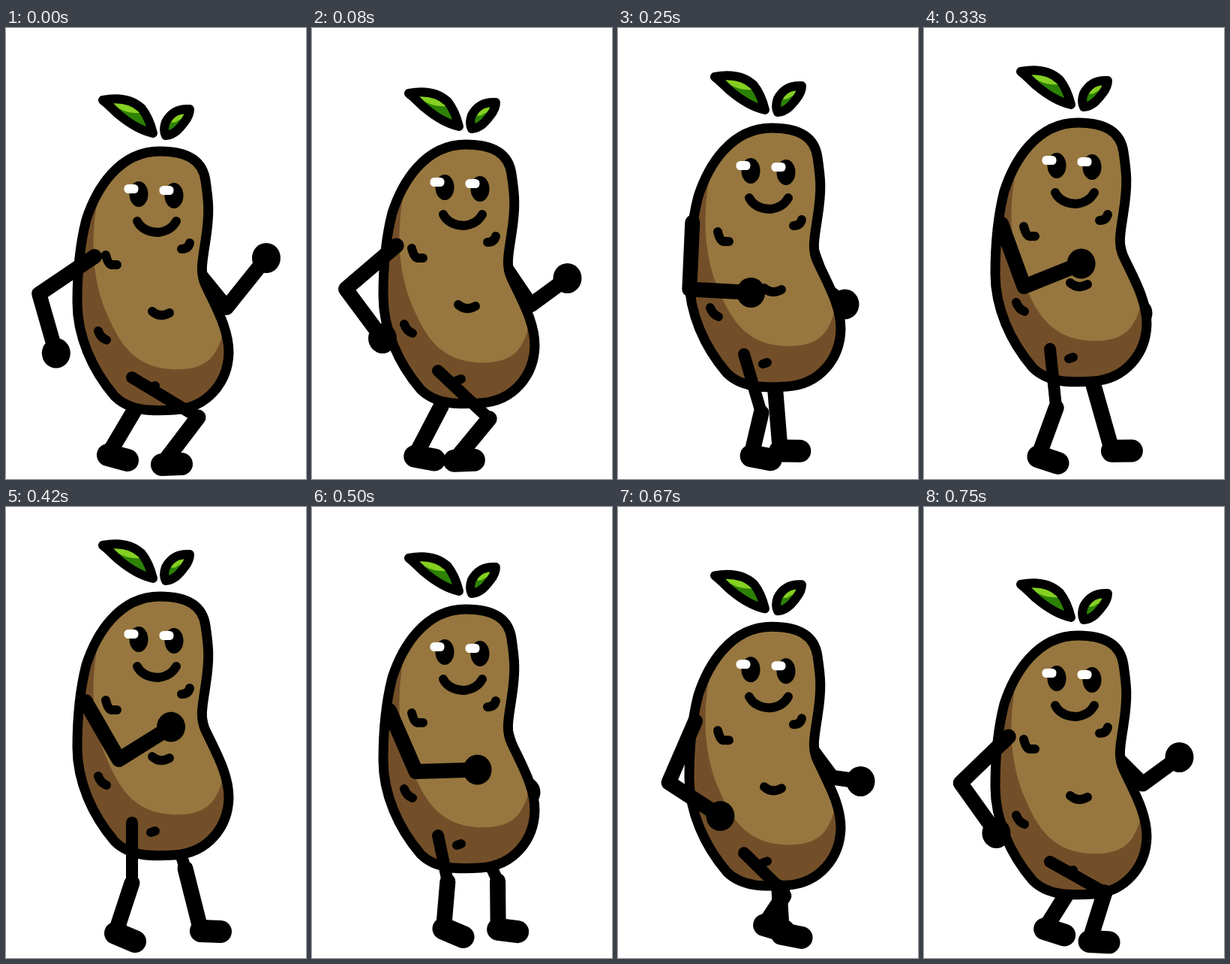
An HTML page with a canvas that plays this animation: 400x600 px, repeating every 0.83 s.

```html
<!DOCTYPE html>
<html lang="en">
<head>
<meta charset="utf-8">
<title>Walking potato</title>
<style>
  html, body { margin: 0; width: 100%; height: 100%; overflow: hidden; background: #fff; }
  canvas { display: block; }
</style>
</head>
<body>
<canvas id="stage" width="400" height="600"></canvas>
<script>
const ctx = document.getElementById('stage').getContext('2d');

const LOOP = 830, STEPS = 10;
// Twelve drawings a second, each start rounded to a hundredth.
const startOf = step => Math.round(step * 25 / 3) * 10;

const BODY = new Path2D(`M205 164 C240 164 262 175 266 203 C270 230 272 245 266 283
  C262 310 258 325 266 342 C280 372 297 400 297 432 C296 470 270 505 225 508
  C195 510 165 510 145 490 C115 455 95 410 95 365 C95 330 98 290 107 255
  C120 215 150 164 205 164Z`);
const LIT = new Path2D(`M100 150 L121 235 C112 290 117 335 131 372 C148 412 165 450 220 454
  C255 456 270 445 278 433 C283 425 290 410 290 395 L310 395 V150Z`);
const SMILE = new Path2D('M175 257 Q182 271 203 272 Q220 270 227 257');
const SPOTS = new Path2D(`M133 302 Q136 315 141 315 L148 315 M245 286 Q243 294 234 294
  M195 377 Q205 386 218 379 M123 403 Q126 412 134 415 M193 478 L199 476`);
const LEAVES = [
  {
    shape: new Path2D(`M129 96 C150 92 168 95 181 107 C189 117 193 128 196 140
      C178 136 162 125 150 115 C143 109 136 101 129 96Z`),
    shine: new Path2D('M133 96 L165 94 L180 106 L182 113 Q168 114 157 110 L146 105Z'),
  },
  {
    shape: new Path2D(`M245 108 C230 107 220 112 213 125 C210 133 211 139 213 143
      C225 142 232 133 238 125 C242 120 245 113 245 108Z`),
    shine: new Path2D('M244 109 L228 111 L218 125 Q226 127 229 123 L238 120Z'),
  },
];

// Periodic value: a mean plus [cosine, sine] amplitudes of successive harmonics.
function wave(step, mean, ...harmonics) {
  return harmonics.reduce((sum, [c, s = 0], i) => {
    const angle = 2 * Math.PI * (i + 1) * step / STEPS;
    return sum + c * Math.cos(angle) + s * Math.sin(angle);
  }, mean);
}

// Linear interpolation through [step, value] points.
function tween(step, keys) {
  const i = keys.findIndex(([at]) => at >= step);
  const [end, to] = keys[i], [start, from] = keys[i - 1] ?? keys[i];
  return end === step ? to : from + (to - from) * (step - start) / (end - start);
}

// Point at a distance from another; 0 degrees hangs down, 90 points right.
function hang([x, y], length, degrees) {
  const angle = degrees * Math.PI / 180;
  return [x + length * Math.sin(angle), y + length * Math.cos(angle)];
}

function limb(width, ...points) {
  ctx.beginPath();
  for (const point of points) ctx.lineTo(...point);
  ctx.lineWidth = width;
  ctx.stroke();
}

function oval(x, y, rx, ry) {
  ctx.fillStyle = '#000';
  ctx.beginPath();
  ctx.ellipse(x, y, rx, ry, 0, 0, Math.PI * 2);
  ctx.fill();
}

function arm(shoulder, elbow, hand) {
  limb(20, shoulder, elbow, hand);
  oval(...hand, 19, 20);
}

function leg(hip, knee, heel, drop) {
  limb(16, hip, knee);
  limb(21, knee, heel);
  limb(30, heel, [heel[0] + 26, heel[1] + drop]);
}

function backLimbs(step, dy) {
  const w = (...args) => wave(step, ...args);
  leg(
    [222, 470 + dy],
    [w(211, [-34, -17], [-6, 1]), w(498, [14, -15], [-3, 3])],
    [w(200, [-62, -9], [-2, -7]), w(563, [2, 4], [3, 2])],
    w(4, [3, -3])
  );
  arm(
    [258, 328 + dy],
    [w(281, [13]), w(354, [18])],
    [w(313, [34]), w(359, [-33], [-9], [-11])]
  );
}

function frontLimbs(step, dy) {
  const w = (...args) => wave(step, ...args);
  leg(
    [168, 465 + dy],
    [w(207, [39, -4], [5], [5]), w(509, [9, 6])],
    [w(188, [27, -18], [-11, -2], [4, -3]), w(570, [7, 3], [4, -3])],
    w(5, [-6, -2])
  );
  const shoulder = [w(106, [6], [6]), w(296, [0], [8]) + dy];
  const elbow = hang(shoulder, 89, w(-13, [-43, -3]));
  const hand = hang(elbow, 82, w(69, [-44, 9], [0, -5], [-9]));
  arm(shoulder, elbow, hand);
}

function fill(path, color) {
  ctx.fillStyle = color;
  ctx.fill(path);
}

function line(path, width) {
  ctx.lineWidth = width;
  ctx.stroke(path);
}

function eye(x, y) {
  oval(x, y, 12.5, 17);
  ctx.fillStyle = '#fff';
  ctx.beginPath();
  ctx.roundRect(x - 19.5, y - 13, 19, 12, 5.5);
  ctx.fill();
}

function potato() {
  for (const { shape, shine } of LEAVES) {
    fill(shape, '#2d8206');
    fill(shine, '#85d022');
    line(shape, 12);
  }
  fill(BODY, '#734f29');
  ctx.save();
  ctx.clip(BODY);
  fill(LIT, '#97773f');
  ctx.restore();
  line(BODY, 13);
  line(SMILE, 12);
  line(SPOTS, 12);
  eye(177, 221);
  eye(224, 223);
}

function draw(now) {
  const t = now % LOOP;
  let step = STEPS - 1;
  while (startOf(step) > t) step--;
  const dy = tween(step, [[0, 0], [1, -9], [3, -31], [5, -45], [6, -28], [9, 7]]);

  ctx.clearRect(0, 0, 400, 600);
  ctx.lineCap = ctx.lineJoin = 'round';
  ctx.strokeStyle = '#000';

  backLimbs(step, dy);
  ctx.save();
  ctx.translate(0, dy);
  potato();
  ctx.restore();
  frontLimbs(step, dy);

  requestAnimationFrame(draw);
}
requestAnimationFrame(draw);
</script>
</body>
</html>
```
